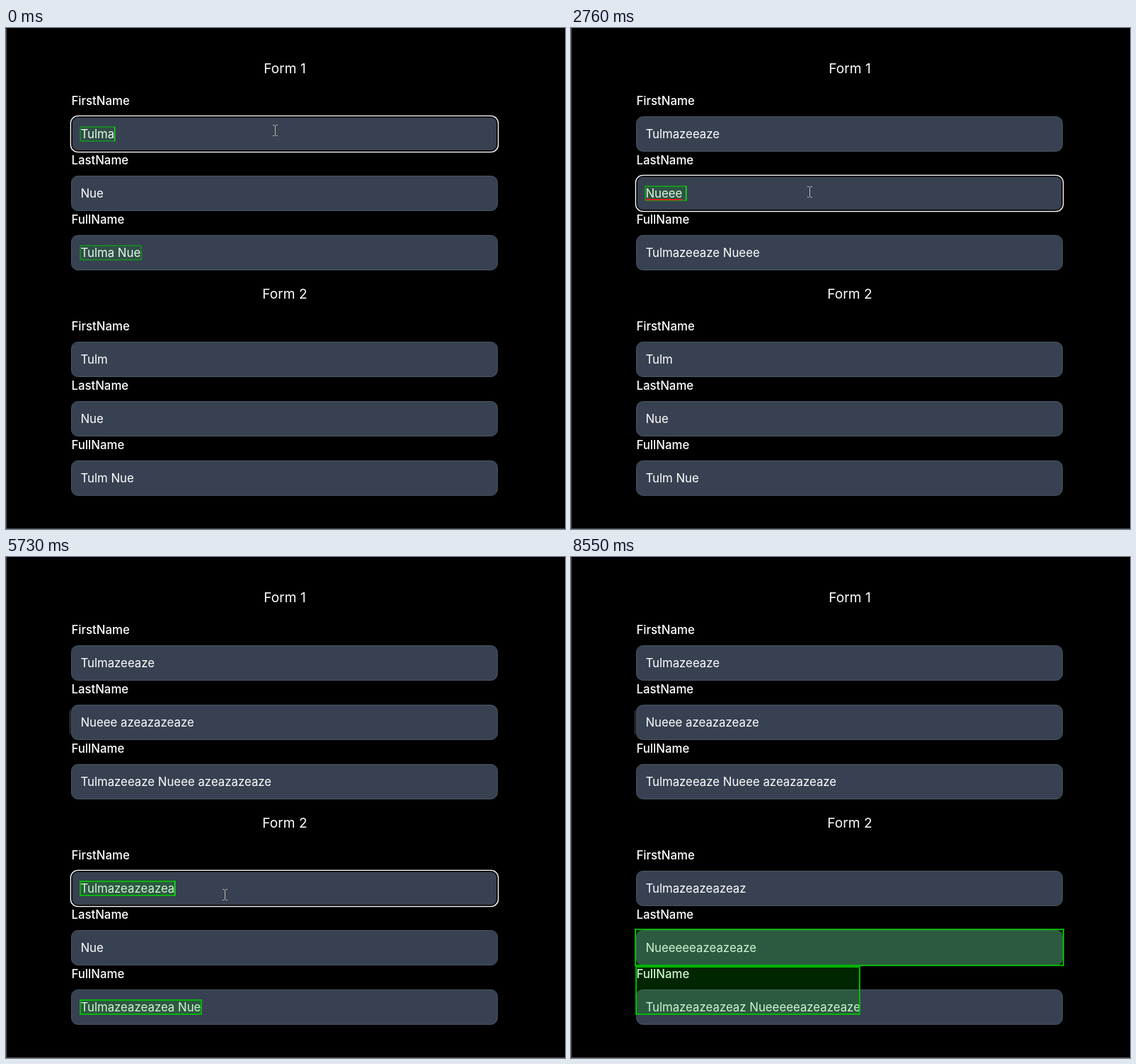
An HTML page that plays this animation: 790x709 px, repeating every 8.57 s.

```html
<!DOCTYPE html>
<html lang="en">
<head>
<meta charset="utf-8">
<title>Two forms</title>
<style>
  html, body { margin: 0; width: 100%; height: 100%; overflow: hidden; background: #000; }
  #stage { position: absolute; inset: 0; width: 790px; height: 709px; overflow: hidden; background: #000;
    color: #fff; font: 16.8px/24px Inter, sans-serif; isolation: isolate; }
  #stage::after { content: ""; position: absolute; inset: 0; border: solid #4c4c4c; border-width: 0 0 1px 1px; }
  #stage div, #stage i, #stage b { position: absolute; box-sizing: border-box; }
  .title { left: 0; width: 788px; text-align: center; font-size: 19.2px; line-height: 28px; }
  .label { left: 92.4px; font-weight: 500; }
  .input { left: 92.4px; width: 603px; height: 50.4px; padding: 12px; border: 1.2px solid #4b5563;
    border-radius: 9.6px; background: #374151; }
  .input.focus { border-color: #101010; box-shadow: 0 0 0 1.3px #fff, inset 0 0 0 1px #101010; }
  .text { position: relative; display: inline-block; height: 24px; white-space: pre; }
  .flash { border: 2px solid rgb(0 200 0 / .95); background: rgb(0 200 0 / .2); background-clip: padding-box; }
  .text .flash { inset: 1px -1.5px; }
  .caret { right: -1px; top: 2px; width: 1.5px; height: 20px; background: #2cdc2c; }
  .typo { left: 0; top: 20px; height: 2px; overflow: hidden; color: transparent; background: #e0231c; font-weight: 400; }
  #mouse { position: absolute; left: -4px; top: -8px; mix-blend-mode: difference; }
</style>
</head>
<body>
<div id="stage"></div>
<script>
const LOOP = 8570;
const stage = document.getElementById('stage');

// Screen refreshes: [step, ms]
const CLOCK = [[0, 0], [1, 150], [9, 1260], [11, 1530], [17, 2340], [20, 2760], [25, 3390], [32, 4380], [33, 4530],
  [35, 4800], [41, 5580], [46, 6240], [49, 6660], [57, 7770], [63, 8550], [64, LOOP]];

// Typed fields: start text, added keys, step of each key
const TYPED = {
  first1: ['Tulm', 'azeeaze', [-1.1, 2, 3.5, 5, 6.5, 8, 10.4]],
  last1: ['Nue', 'ee azeazazeaze', [16, 17, 19.3, 21, 21.6, 22.2, 22.8, 23.4, 24, 24.5, 25.5, 27, 28.5, 30.1]],
  first2: ['Tulm', 'azeazeazeaz', [34, 35, 36, 37, 37.8, 38.6, 39.4, 40.2, 41, 41.8, 42.6]],
  last2: ['Nue', 'eeeeazeazeaze', [49, 50, 51, 52, 53, 53.6, 54.2, 54.8, 55.4, 56, 57.5, 58.5, 59.5]]
};
const FOCUS = [[-9, 'first1'], [13, 'last1'], [32.8, 'first2'], [45.3, 'last2'], [62.9, '']];
const MOUSE = [[0, 380, 145], [3, 380, 145], [9, 337, 232], [25, 337, 232], [31, 309, 478], [43, 309, 478],
  [45, 322, 560], [59, 322, 560], [62, 345, 725], [64, 345, 725]];

// Repainted areas: step, left, top, right, bottom
const AREAS = [
  [13, 90, 122, 697, 176], [13, 90, 206, 697, 260], [13, 91, 259, 697, 663],
  [32.8, 90, 206, 697, 260], [32.8, 90, 442, 697, 495], [32.8, 91, 495, 697, 663],
  [45.8, 90, 442, 697, 495], [45.5, 90, 526, 697, 579], [45.8, 90, 526, 697, 579], [45.5, 91, 578, 697, 650],
  [62.9, 90, 526, 697, 579], [62.9, 91, 579, 409, 648]
];

function add(parent, tag, cls, text = '', style = {}) {
  const el = document.createElement(tag);
  el.className = cls;
  el.textContent = text;
  Object.assign(el.style, style);
  return parent.appendChild(el);
}

function addField(name, top) {
  add(stage, 'div', 'label', name, { top: top + 'px' });
  const input = add(stage, 'div', 'input', '', { top: top + 33.6 + 'px' });
  const text = add(input, 'span', 'text');
  return {
    input,
    value: add(text, 'span', ''),
    flash: add(text, 'i', 'flash'),
    typo: add(text, 'b', 'typo', 'Nueee'),
    caret: add(text, 'i', 'caret')
  };
}

const fields = {};
[1, 2].forEach((n, i) => {
  const top = 91 + i * 319.2;
  add(stage, 'div', 'title', 'Form ' + n, { top: top - 48 + 'px' });
  ['First', 'Last', 'Full'].forEach((kind, row) => {
    fields[kind.toLowerCase() + n] = addField(kind + 'Name', top + row * 84);
  });
});

const areas = AREAS.map(([at, l, t, r, b]) => ({
  at,
  el: add(stage, 'i', 'flash', '', { left: l + 'px', top: t + 'px', width: r - l + 'px', height: b - t + 'px' })
}));

stage.insertAdjacentHTML('beforeend', `<svg id="mouse" width="9" height="17">
  <path d="M1 .5h2.5M5.5 .5h2.5M1 15.5h2.5M5.5 15.5h2.5M4.5 1v14" fill="none" stroke="#fff"/></svg>`);
const mouse = document.getElementById('mouse');

const glow = age => age < 0 ? 0 : Math.max(0, 1 - age / 2.2);
const show = (el, on) => { el.style.display = on ? '' : 'none'; };

function stepAt(ms) {
  const k = CLOCK.findIndex(c => c[1] > ms);
  const [[s0, t0], [s1, t1]] = [CLOCK[k - 1], CLOCK[k]];
  return Math.floor(s0 + (s1 - s0) * (ms - t0) / (t1 - t0) + 1e-6);
}

function typedAt(id, step) {
  const [start, keys, times] = TYPED[id];
  const count = times.filter(t => t <= step).length;
  return {
    text: start + keys.slice(0, count),
    last: count ? times[count - 1] : -99,
    space: count > 0 && keys[count - 1] === ' '
  };
}

function setField(id, text, age) {
  fields[id].value.textContent = text;
  fields[id].flash.style.opacity = glow(age);
}

function draw(step) {
  const [since, focus] = FOCUS.filter(f => f[0] <= step).pop();
  for (const n of [1, 2]) {
    const [first, last] = ['first', 'last'].map(kind => {
      const id = kind + n, state = typedAt(id, step);
      setField(id, state.text, step - state.last);
      const active = id === focus;
      const idle = step - Math.max(since, state.last);
      fields[id].input.classList.toggle('focus', active);
      show(fields[id].caret, active && Math.floor((idle + 1.85) / 3.7) % 2 === 0);
      show(fields[id].typo, active && state.text.includes(' '));
      return state;
    });
    const recent = Math.max(first.last, last.space ? -99 : last.last);
    setField('full' + n, first.text + ' ' + last.text, step - recent);
  }
  for (const { at, el } of areas) el.style.opacity = glow(step - at);

  const k = Math.max(1, MOUSE.findIndex(m => m[0] >= step));
  const [a, b] = [MOUSE[k - 1], MOUSE[k]];
  const p = (step - a[0]) / (b[0] - a[0]);
  const [x, y] = [1, 2].map(i => Math.round(a[i] + (b[i] - a[i]) * p));
  mouse.style.transform = `translate(${x}px, ${y}px)`;
}

for (const id of ['full1', 'full2']) {
  show(fields[id].caret, false);
  show(fields[id].typo, false);
}

const begin = performance.now();
function tick() {
  draw(stepAt((performance.now() - begin) % LOOP));
  requestAnimationFrame(tick);
}
tick();
</script>
</body>
</html>
```
